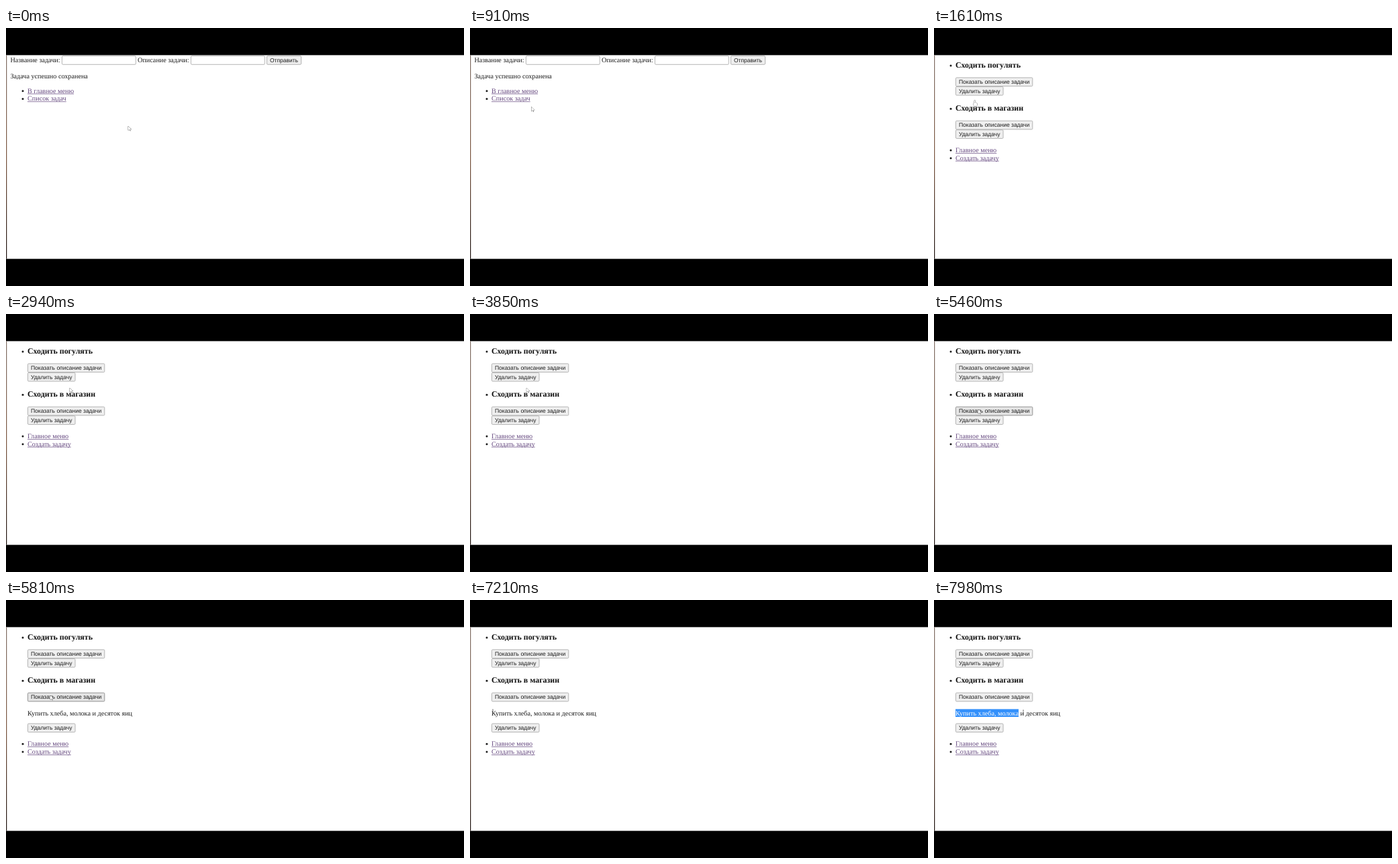
Recreate the animation shown at these times as an HTML page with a canvas. Size 682 px wide and 384 px high, loop 8000 ms.

```html
<!DOCTYPE html>
<html lang="ru">
<head>
<meta charset="utf-8">
<title>Список задач</title>
<style>
  html, body { margin: 0; width: 100%; height: 100%; overflow: hidden; background: #000; }
  canvas { display: block; width: 682px; height: 384px; }
</style>
</head>
<body>
<canvas id="stage" width="682" height="384"></canvas>
<script>
const ctx = document.getElementById('stage').getContext('2d');
const LOOP = 8000, STEP = 70;
const LIST_AT = 1540, OPEN_AT = 5670, DRAG_AT = 7280;

const SERIF = '10.18px "Liberation Serif", serif';
const BOLD = 'bold 11.93px "Liberation Serif", serif';
const SANS = '8.51px "Liberation Sans", sans-serif';
const INK = '#1c1c1c', LINK = '#65487f';

// Page metrics
const LEFT = 32, LINE = 11.7, BUTTON = 13.5, TASK = 64.3, NOTE_SHIFT = 32.3;
const NOTE = 'Купить хлеба, молока и десяток яиц';
const NOTE_Y = 171.5;

const START = { x: 182, y: 146 };
const moves = [
  { from: 70, to: 1330, x: 60, y: 107.5 },
  { from: 2240, to: 2940, x: 95, y: 110 },
  { from: 3080, to: 4900, x: 67, y: 110 },
  { from: 5110, to: 5460, x: 66, y: 142 },
  { from: 6300, to: 7140, x: 34, y: 166 },
  { from: DRAG_AT, to: 7980, x: 133, y: 167 }
];

function pointerAt(t) {
  let { x, y } = START;
  for (const m of moves) {
    const u = Math.max(0, Math.min(1, (t - m.from) / (m.to - m.from)));
    const k = u * u * (3 - 2 * u);
    x += (m.x - x) * k;
    y += (m.y - y) * k;
  }
  return { x, y };
}

function text(str, x, y, font = SERIF, color = INK) {
  ctx.font = font;
  ctx.fillStyle = color;
  ctx.fillText(str, x, y);
}

function bullet(y) {
  ctx.fillStyle = INK;
  ctx.beginPath();
  ctx.arc(25, y - 3, 1.5, 0, Math.PI * 2);
  ctx.fill();
}

function links(names, y) {
  names.forEach((name, i) => {
    const base = y + i * LINE;
    bullet(base);
    text(name, LEFT, base, SERIF, LINK);
    ctx.fillRect(LEFT, base + 1, ctx.measureText(name).width, 0.7);
  });
}

function box(x, y, w, fill, stroke) {
  ctx.beginPath();
  ctx.roundRect(x + 0.4, y + 0.4, w - 0.8, BUTTON - 0.8, 1.4);
  ctx.fillStyle = fill;
  ctx.fill();
  ctx.strokeStyle = stroke;
  ctx.lineWidth = 0.8;
  ctx.stroke();
}

function button(str, x, y, hover) {
  ctx.font = SANS;
  const w = ctx.measureText(str).width + 9.8;
  box(x, y, w, hover ? '#e5e5e5' : '#efefef', hover ? '#7c7c7c' : '#a2a2a2');
  text(str, x + 4.9, y + 9.6, SANS);
}

function field(label, x, inputX) {
  text(label, x, 51);
  box(inputX, 41.2, 110.7, '#fff', '#a2a2a2');
}

function formPage() {
  field('Название задачи:', 6.4, 83);
  field('Описание задачи:', 196, 275);
  button('Отправить', 388, 41.2);
  text('Задача успешно сохранена', 6.4, 74.5);
  links(['В главное меню', 'Список задач'], 96.7);
}

function note(t, pointerX) {
  text(NOTE, LEFT, NOTE_Y);
  if (t <= DRAG_AT) return;
  const width = n => ctx.measureText(NOTE.slice(0, n)).width;
  let n = 0;
  while (n < NOTE.length && LEFT + width(n + 1) <= pointerX - 6) n++;
  ctx.fillStyle = '#3390fb';
  ctx.fillRect(LEFT, NOTE_Y - 9.1, width(n), 11.6);
  text(NOTE.slice(0, n), LEFT, NOTE_Y, SERIF, '#fff');
}

function listPage(t, p) {
  const open = t >= OPEN_AT;
  const shift = open ? NOTE_SHIFT : 0;
  ['Сходить погулять', 'Сходить в магазин'].forEach((title, i) => {
    const y = 59 + i * TASK;
    const top = y + 14.5;
    const hover = p.y >= top && p.y < top + BUTTON;
    bullet(y);
    text(title, LEFT, y, BOLD, '#101010');
    button('Показать описание задачи', LEFT, top, hover);
    button('Удалить задачу', LEFT, top + BUTTON + i * shift);
  });
  if (open) note(t, p.x);
  links(['Главное меню', 'Создать задачу'], 185 + shift);
}

function outline() {
  ctx.strokeStyle = '#444';
  ctx.lineWidth = 0.7;
  ctx.stroke();
  ctx.fillStyle = '#fff';
  ctx.fill();
}

function arrow(x, y) {
  ctx.beginPath();
  ctx.moveTo(x, y);
  ctx.lineTo(x, y + 6.3);
  ctx.lineTo(x + 1.8, y + 4.8);
  ctx.lineTo(x + 3, y + 7.2);
  ctx.lineTo(x + 2.7, y + 4.6);
  ctx.lineTo(x + 4.5, y + 4.5);
  ctx.closePath();
  outline();
}

function hand(x, y) {
  ctx.beginPath();
  ctx.roundRect(x, y, 1.4, 6, 0.7);
  ctx.roundRect(x - 1, y + 3.8, 5.2, 4.8, 1.4);
  outline();
}

function beam(x, y) {
  ctx.fillStyle = '#555';
  ctx.fillRect(x - 0.3, y - 3, 0.6, 6);
  for (const end of [-3, 3]) ctx.fillRect(x - 1, y + end - 0.3, 2, 0.6);
}

function pointer(t, p) {
  const overLink = t < LIST_AT ? p.x < 90 && p.y < 111 : t < 1680;
  const overTitle = t > LIST_AT && p.y > 113 && p.y < 127;
  const overNote = t > OPEN_AT && p.y > 162;
  const draw = overLink ? hand : overTitle || overNote ? beam : arrow;
  draw(p.x, p.y);
}

function page() {
  ctx.fillStyle = '#000';
  ctx.fillRect(0, 0, 682, 384);
  ctx.fillStyle = '#fff';
  ctx.fillRect(0, 40.4, 682, 303.2);
  const edge = ctx.createLinearGradient(0, 40, 0, 344);
  ['#8a7a72', '#84614c', '#2b211e'].forEach((c, i) => edge.addColorStop(i / 2, c));
  ctx.fillStyle = edge;
  ctx.fillRect(0, 40.4, 1.3, 303.2);
}

function draw(now) {
  const t = Math.floor((now % LOOP) / STEP) * STEP;
  const p = pointerAt(t);
  ctx.textRendering = 'geometricPrecision';
  page();
  ctx.filter = 'blur(0.25px)';
  if (t < LIST_AT) formPage();
  else listPage(t, p);
  pointer(t, p);
  ctx.filter = 'none';
  requestAnimationFrame(draw);
}

requestAnimationFrame(draw);
</script>
</body>
</html>
```
